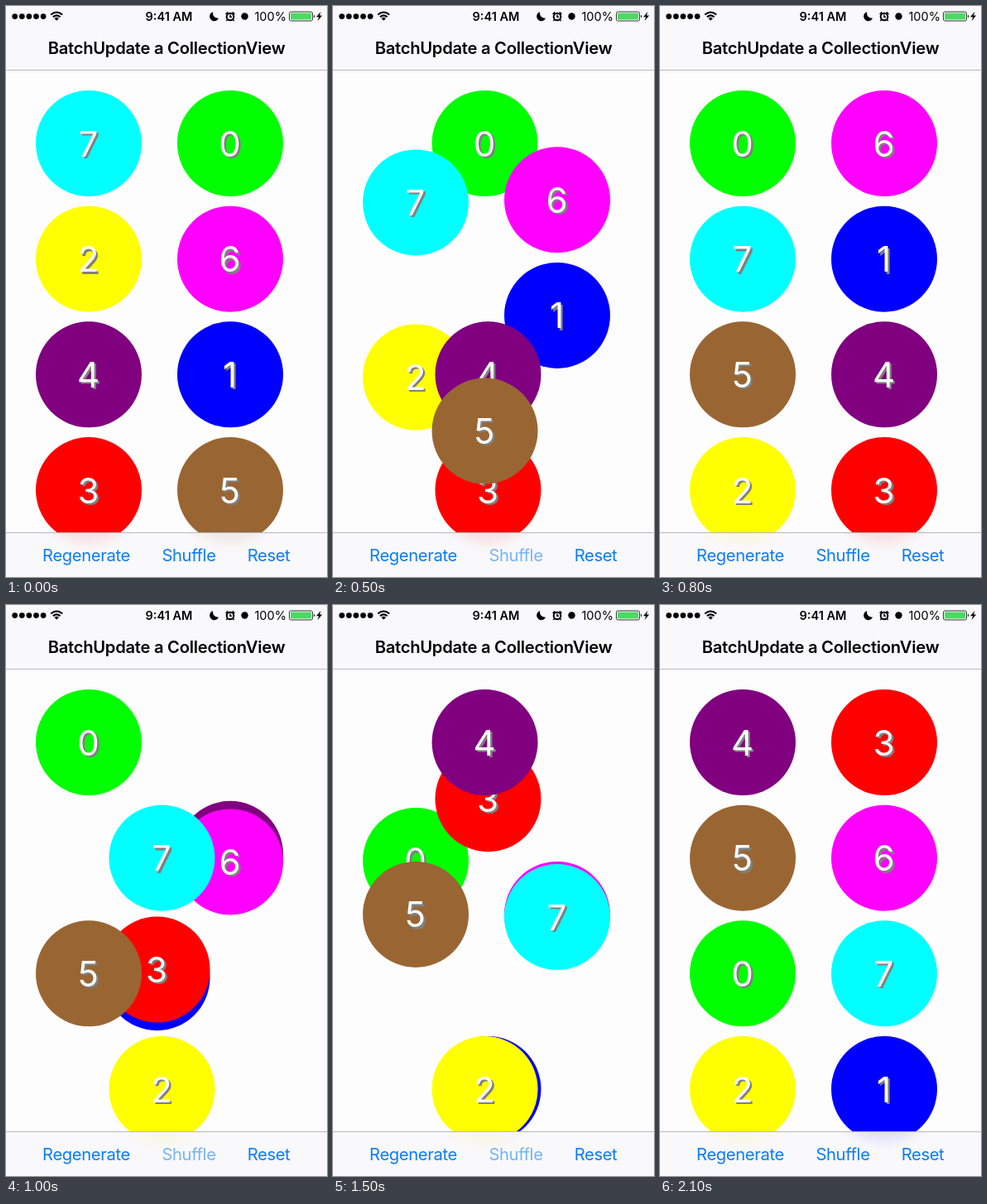
Recreate the animation shown at these times as an HTML page. Size 388 px wide and 690 px high, loop 2300 ms.

```html
<!DOCTYPE html>
<html lang="en">
<head>
<meta charset="utf-8">
<title>Collection shuffle</title>
<style>
  html, body { margin: 0; width: 100%; height: 100%; overflow: hidden; background: #fefdfe; }
  svg { display: block; width: 388px; height: 690px; }
  text { font-family: Inter, Roboto, sans-serif; text-anchor: middle; }
  .digit { font-size: 42px; }
  .title { font-size: 20.2px; font-weight: 600; letter-spacing: -.27px; }
  .button { font-size: 20.2px; letter-spacing: -.35px; fill: #0b7cf6; }
  .status { font-size: 14.5px; }
</style>
</head>
<body>
<svg viewBox="0 0 388 690">
  <defs>
    <filter id="blur" filterUnits="userSpaceOnUse" x="0" y="420" width="388" height="270">
      <feGaussianBlur stdDeviation="7"/>
    </filter>
    <clipPath id="barClip"><rect y="637" width="388" height="53"/></clipPath>
  </defs>
  <rect width="388" height="690" fill="#fefdfe"/>
  <g id="cells"></g>

  <rect width="388" height="77.5" fill="#f9f8fa"/>
  <rect y="77" width="388" height="1" fill="#b9b8ba"/>
  <text class="title" x="194" y="58">BatchUpdate a CollectionView</text>

  <g id="dots"></g>
  <g fill="none" stroke="#000" stroke-width="2">
    <path d="M54.2 10.6Q61.2 4.4 68.2 10.6M56.8 13.3Q61.2 9.5 65.6 13.3"/>
  </g>
  <path d="M58.5 14.9Q61.2 12.8 63.9 14.9L61.2 17.7Z"/>
  <text class="status" x="197" y="17.6" font-weight="600">9:41 AM</text>
  <path d="M250.3 7.2A5.6 5.6 0 1 0 257 14.6A5.9 5.9 0 0 1 250.3 7.2Z"/>
  <g fill="none" stroke="#000">
    <circle cx="271" cy="13" r="4.3" stroke-width="2"/>
    <path d="M271 10.6V13.2H273M265.6 10L268.3 7.4M276.4 10L273.7 7.4M267.6 16.6L266.3 18M274.4 16.6L275.7 18" stroke-width="1.5"/>
  </g>
  <circle cx="288.5" cy="12.5" r="4.2"/>
  <text class="status" x="319.7" y="17.6">100%</text>
  <rect x="342.5" y="7" width="28" height="11" rx="2" fill="#fff" stroke="#333" stroke-width="1"/>
  <rect x="344" y="8.5" width="25" height="8" rx=".8" fill="#4cd964"/>
  <path d="M372 10.5Q374.2 12.5 372 14.5Z"/>
  <path d="M380.5 7L375 13.3H378.2L376.6 18L382.2 11.6H379Z"/>

  <rect y="636" width="388" height="54" fill="#f9f8fa"/>
  <g clip-path="url(#barClip)">
    <use href="#cells" filter="url(#blur)" opacity=".1"/>
  </g>
  <rect y="636" width="388" height="1" fill="#b9b8ba"/>
  <text class="button" x="97" y="671">Regenerate</text>
  <text class="button" id="shuffle" x="221" y="671">Shuffle</text>
  <text class="button" x="317.5" y="671">Reset</text>
</svg>
<script>
const LOOP = 2300, STEP = 100, MOVE = 300, FADE = 350;
const colors = ['#0f0', '#00f', '#ff0', '#f00', '#800080', '#996633', '#f0f', '#0ff'];
const orders = ['70264135', '06715423', '04375612', '43560721'];
const taps = [348, 847, 1348];

const make = (parent, tag, attrs, text = '') => {
  const node = document.createElementNS('http://www.w3.org/2000/svg', tag);
  for (const key in attrs) node.setAttribute(key, attrs[key]);
  node.textContent = text;
  return parent.appendChild(node);
};
const byId = id => document.getElementById(id);
const clamp = v => Math.min(1, Math.max(0, v));

for (let i = 0; i < 5; i++) make(byId('dots'), 'circle', { cx: 10.7 + i * 8.6, cy: 12.6, r: 3.4 });

const cells = colors.map((fill, n) => {
  const cell = make(byId('cells'), 'g', {});
  make(cell, 'circle', { r: 64, fill });
  make(cell, 'text', { class: 'digit', x: 1.9, y: 17.9, fill: '#808080' }, n);
  make(cell, 'text', { class: 'digit', x: -.5, y: 15.5, fill: '#fff' }, n);
  return cell;
});

// Ease-in-out, cubic-bezier(.42, 0, .58, 1), solved by bisection.
function ease(x) {
  let low = 0, high = 1, s = x;
  for (let i = 0; i < 24; i++) {
    s = (low + high) / 2;
    const at = 1.26 * s * (1 - s) ** 2 + 1.74 * s * s * (1 - s) + s ** 3;
    if (at < x) low = s; else high = s;
  }
  return s * s * (3 - 2 * s);
}

function place(order, n) {
  const slot = order.indexOf(n);
  return [100 + slot % 2 * 171, 166 + Math.floor(slot / 2) * 139.67];
}

function draw(time) {
  const t = Math.floor(time % LOOP / STEP) * STEP;
  const count = taps.filter(tap => tap <= t).length;
  const from = orders[Math.max(0, count - 1)], to = orders[count];
  const since = count ? t - taps[count - 1] : LOOP;
  const k = ease(clamp(since / MOVE));
  cells.forEach((cell, n) => {
    const [x0, y0] = place(from, n), [x1, y1] = place(to, n);
    cell.setAttribute('transform', `translate(${x0 + (x1 - x0) * k} ${y0 + (y1 - y0) * k})`);
  });
  byId('shuffle').setAttribute('opacity', .2 + .8 * clamp(since / FADE));
}

const start = performance.now();
function tick() {
  draw(performance.now() - start + 8);
  requestAnimationFrame(tick);
}
tick();
</script>
</body>
</html>
```
